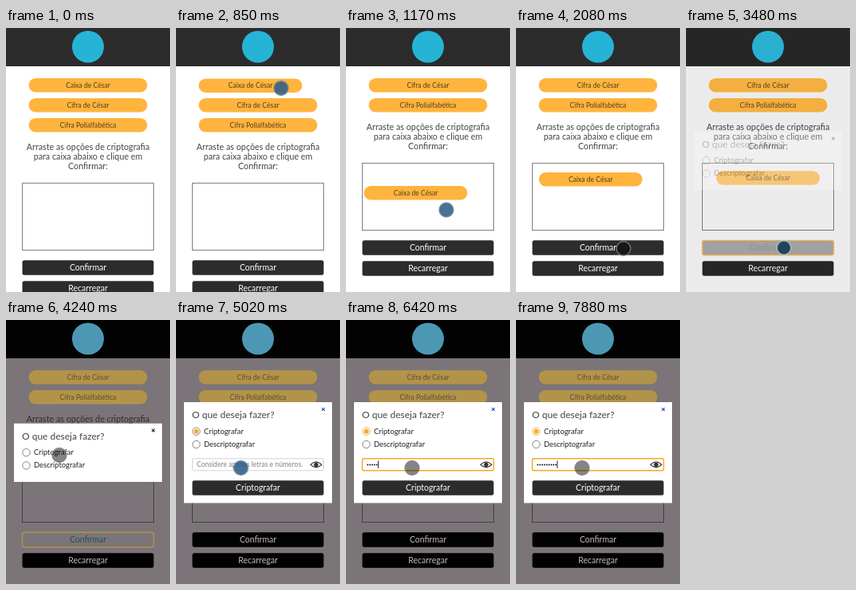
Write an HTML page that moves like this. It is 206 px wide and 331 px high and loops after 8000 ms.

```html
<!DOCTYPE html>
<html lang="pt">
<head>
<meta charset="utf-8">
<style>
html, body { margin: 0; width: 100%; height: 100%; overflow: hidden; background: #fff; }
svg { display: block; }
text { font-family: Lato, "Open Sans", sans-serif; }
</style>
</head>
<body>
<svg id="stage" width="206" height="331" viewBox="0 0 206 331"></svg>
<script>
const LOOP = 8000;
const stage = document.getElementById('stage');

function add(parent, tag, attrs, text) {
  const el = document.createElementNS('http://www.w3.org/2000/svg', tag);
  set(el, attrs);
  if (text) el.textContent = text;
  parent.appendChild(el);
  return el;
}
function set(el, attrs) {
  for (const k in attrs) el.setAttribute(k, attrs[k]);
}

// Linear track: keys are [time, value]
function track(keys, t) {
  let [t0, v0] = keys[0];
  if (t <= t0) return v0;
  for (const [t1, v1] of keys) {
    if (t < t1) return v0 + (v1 - v0) * (t - t0) / (t1 - t0);
    t0 = t1; v0 = v1;
  }
  return v0;
}
const span = (t, a, b) => Math.min(1, Math.max(0, (t - a) / (b - a)));
const ease = p => p * p * (3 - 2 * p);
const mix = (a, b, p) => a.map((v, i) => v + (b[i] - v) * p);
const css = c => `rgb(${c.map(Math.round)})`;

// Each colour has a normal and a dimmed tone
const TONES = {
  page: [[255, 255, 255], [123, 117, 121]],
  dark: [[44, 44, 44], [2, 2, 2]],
  logo: [[38, 180, 214], [76, 152, 180]],
  amber: [[255, 180, 62], [178, 147, 74]],
  label: [[84, 62, 28], [96, 76, 44]],
  ink: [[68, 68, 68], [50, 42, 52]],
  line: [[128, 128, 128], [66, 62, 64]],
  light: [[255, 255, 255], [194, 189, 192]],
  teal: [[84, 90, 94], [38, 78, 88]]
};
const tone = (name, dim) => mix(...TONES[name], dim);
const painted = [];
function paint(el, attr, name) {
  painted.push([el, attr, name]);
  return el;
}

function label(parent, x, y, size, str, name, anchor = 'middle') {
  const el = add(parent, 'text', { x, y, 'font-size': size, 'text-anchor': anchor }, str);
  return name ? paint(el, 'fill', name) : el;
}
function pill(width, str) {
  const g = add(stage, 'g', {});
  const box = add(g, 'rect', { width, height: 17.5, rx: 8.75 });
  paint(box, 'fill', 'amber');
  const text = label(g, width / 2, 12, 8.6, str, 'label');
  return { g, box, text };
}
function button(parent, y, str) {
  const box = add(parent, 'rect', { x: 20.5, y, width: 165, height: 18.5, rx: 2.5 });
  const text = label(parent, 103, y + 13, 10.5, str);
  return { box, text };
}
const move = (el, x, y) => el.setAttribute('transform', `translate(${x} ${y})`);

// Page
paint(add(stage, 'rect', { width: 206, height: 331 }), 'fill', 'page');
paint(add(stage, 'rect', { width: 206, height: 48 }), 'fill', 'dark');
paint(add(stage, 'circle', { cx: 103, cy: 23.5, r: 20 }), 'fill', 'logo');

const body = add(stage, 'g', {});
['Arraste as opções de criptografia', 'para caixa abaixo e clique em', 'Confirmar:']
  .forEach((s, i) => label(body, 103, 153 + 12 * i, 10.75, s, 'ink'));
paint(add(body, 'rect', { x: 20.5, y: 194.5, width: 165, height: 84, fill: 'none' }), 'stroke', 'line');
const confirm = button(body, 291.3, 'Confirmar');
const reload = button(body, 317.3, 'Recarregar');
paint(reload.box, 'fill', 'dark');
paint(reload.text, 'fill', 'light');

const rest = ['Cifra de César', 'Cifra Polialfabética'].map(s => pill(149, s));
const dragged = pill(149, 'Caixa de César');

// Dialog, in its own clipped viewport
const modal = add(stage, 'svg', { x: 10, width: 186, overflow: 'hidden' });
add(modal, 'rect', { width: 186, height: 127, fill: '#fff' });
const sheet = add(modal, 'g', { transform: 'translate(-10 0)' });
label(sheet, 20, 20.5, 12, 'O que deseja fazer?').setAttribute('fill', '#444');
const cross = add(sheet, 'path', { d: 'M183.2 7.2l3.6 3.6m0-3.6l-3.6 3.6', 'stroke-width': 1.1 });
sheet.querySelector('text').setAttribute('text-anchor', 'start');
const radios = ['Criptografar', 'Descriptografar'].map((s, i) => {
  const y = 36.7 + 16.3 * i;
  const ring = add(sheet, 'circle', { cx: 25.5, cy: y, r: 4.7, fill: '#fff', stroke: '#777', 'stroke-width': 0.9 });
  label(sheet, 35, y + 3, 9.4, s, null, 'start').setAttribute('fill', '#222');
  return ring;
});
const dot = add(sheet, 'circle', { cx: 25.5, cy: 36.7, fill: '#f9a825' });
const form = add(sheet, 'g', {});
const field = add(form, 'rect', { x: 20.5, y: 70.8, width: 165, height: 15, rx: 2, fill: '#fff' });
const hint = label(form, 26, 81.3, 8.6, 'Considere apenas letras e números.', null, 'start');
hint.setAttribute('fill', '#808080');
add(form, 'path', { d: 'M169 78.4Q176 71.6 183 78.4Q176 85.2 169 78.4Z', fill: '#fff', stroke: '#333', 'stroke-width': 1.2 });
add(form, 'circle', { cx: 176, cy: 78.4, r: 2.7, fill: '#333' });
const bullets = Array.from({ length: 9 }, (_, i) =>
  add(form, 'circle', { cx: 27.3 + 2.85 * i, cy: 78.5, r: 0.95, fill: '#111' }));
const caret = add(form, 'rect', { y: 73.4, width: 0.9, height: 9.6, fill: '#111' });
const go = button(form, 98.3, 'Criptografar');
set(go.box, { fill: '#2c2c2c' });
set(go.text, { fill: '#fff' });

// Pointer
const pointer = add(stage, 'g', {});
const core = add(pointer, 'circle', { r: 8.8 });
const rim = add(pointer, 'circle', { r: 8.9, fill: 'none', 'stroke-width': 1.6 });

const POINTER_X = [[40, 121], [250, 147], [650, 132], [850, 132], [1170, 126], [1470, 126],
  [2080, 135], [2240, 139], [2560, 139], [2600, 134], [2870, 134], [2990, 123], [3560, 123],
  [3800, 105], [4160, 67], [4400, 67], [4890, 81.5], [5100, 81.5], [5260, 83]];
const POINTER_Y = [[40, 182], [250, 130], [650, 75], [850, 75], [1170, 228], [1470, 228],
  [1950, 270], [2080, 276.5], [2560, 276.5], [2600, 285], [2870, 285], [2990, 275.5],
  [3560, 275.5], [3800, 225], [4160, 169.5], [4400, 169.5], [4890, 185.5]];
const PRESS = [[800, 0], [850, 1], [1200, 1], [1290, 0], [3360, 0], [3440, 1], [3560, 1], [3660, 0],
  [4280, 0], [4370, 1], [4440, 1], [4540, 0], [4890, 0], [5000, 1], [5100, 1], [5240, 0]];
const ITEM_X = [[850, 28.5], [1170, 22.5], [1470, 22.8], [2080, 28.7], [2240, 38]];
const ITEM_Y = [[850, 63], [1170, 198], [1470, 197.5], [1750, 188], [2080, 181], [2240, 179.3]];
const HOVER = [[3360, 0], [3480, 0.62], [3600, 1], [4370, 1], [4800, 0]];
const DIM = [[3380, 0], [3480, 0.14], [3850, 0.75], [4160, 1]];
const FADE = [[3380, 0], [3480, 0.28], [3700, 0.85], [3900, 1]];
const TYPED = [5700, 5810, 6010, 6190, 6420, 7150, 7360, 7620, 7880];

function drawPage(t, dim) {
  for (const [el, attr, name] of painted) el.setAttribute(attr, css(tone(name, dim)));

  const lift = t < 870 ? 0 : 25;
  move(body, 0, -lift);
  rest.forEach((p, i) => move(p.g, 28.5, 88 + 25 * i - lift));

  const width = t < 850 ? 149 : 130;
  dragged.box.setAttribute('width', width);
  dragged.text.setAttribute('x', width / 2);
  move(dragged.g, track(ITEM_X, t), track(ITEM_Y, t));

  const h = track(HOVER, t);
  set(confirm.box, {
    fill: css(mix(tone('dark', dim), tone('page', dim), h)),
    stroke: css(tone('amber', dim)),
    'stroke-width': 1.5 * Math.min(1, h * 1.4)
  });
  confirm.text.setAttribute('fill', css(mix(tone('light', dim), tone('teal', dim), h)));
}

function drawModal(t) {
  const grow = ease(span(t, 4390, 4800));
  const height = 73.5 + 53 * grow;
  set(modal, { y: 166.2 - height / 2, height, opacity: track(FADE, t) });
  cross.setAttribute('stroke', t < 4400 ? '#222' : '#2457a8');

  const pick = span(t, 4380, 4500);
  const focus = span(t, 5030, 5200);
  dot.setAttribute('r', 2.9 * pick);
  radios[0].setAttribute('stroke', css(mix([119, 119, 119], [240, 165, 45], span(t, 5020, 5200))));
  form.setAttribute('opacity', ease(span(t, 4450, 4800)));
  set(field, {
    stroke: css(mix([205, 205, 205], [247, 168, 40], focus)),
    'stroke-width': 0.9 + 0.6 * focus
  });

  const count = TYPED.filter(at => at <= t).length;
  hint.setAttribute('opacity', count ? 0 : 1);
  bullets.forEach((b, i) => b.setAttribute('opacity', i < count ? 1 : 0));
  const last = count ? TYPED[count - 1] : 5030;
  const on = t >= 5030 && t - last < (count ? 500 : 460);
  set(caret, { x: 26 + 2.83 * count, opacity: on ? 1 : 0 });
}

function drawPointer(t) {
  const p = track(PRESS, t);
  const glow = p * (t > 3360 && t < 3700 ? 1 : 0);
  move(pointer, track(POINTER_X, t), track(POINTER_Y, t));
  pointer.setAttribute('opacity', t < 40 ? 0 : 1);
  const fill = mix([0, 0, 0], mix([42, 88, 135], [22, 50, 75], glow), p);
  set(core, { fill: css(fill), 'fill-opacity': 0.48 + 0.38 * p });
  set(rim, {
    stroke: css(mix(mix([125, 122, 124], [112, 130, 146], p), [150, 203, 228], glow)),
    'stroke-opacity': 0.85
  });
}

function draw(t) {
  drawPage(t, track(DIM, t));
  drawModal(t);
  drawPointer(t);
}

const start = performance.now();
function tick() {
  draw((performance.now() - start) % LOOP);
  requestAnimationFrame(tick);
}
tick();
</script>
</body>
</html>
```
